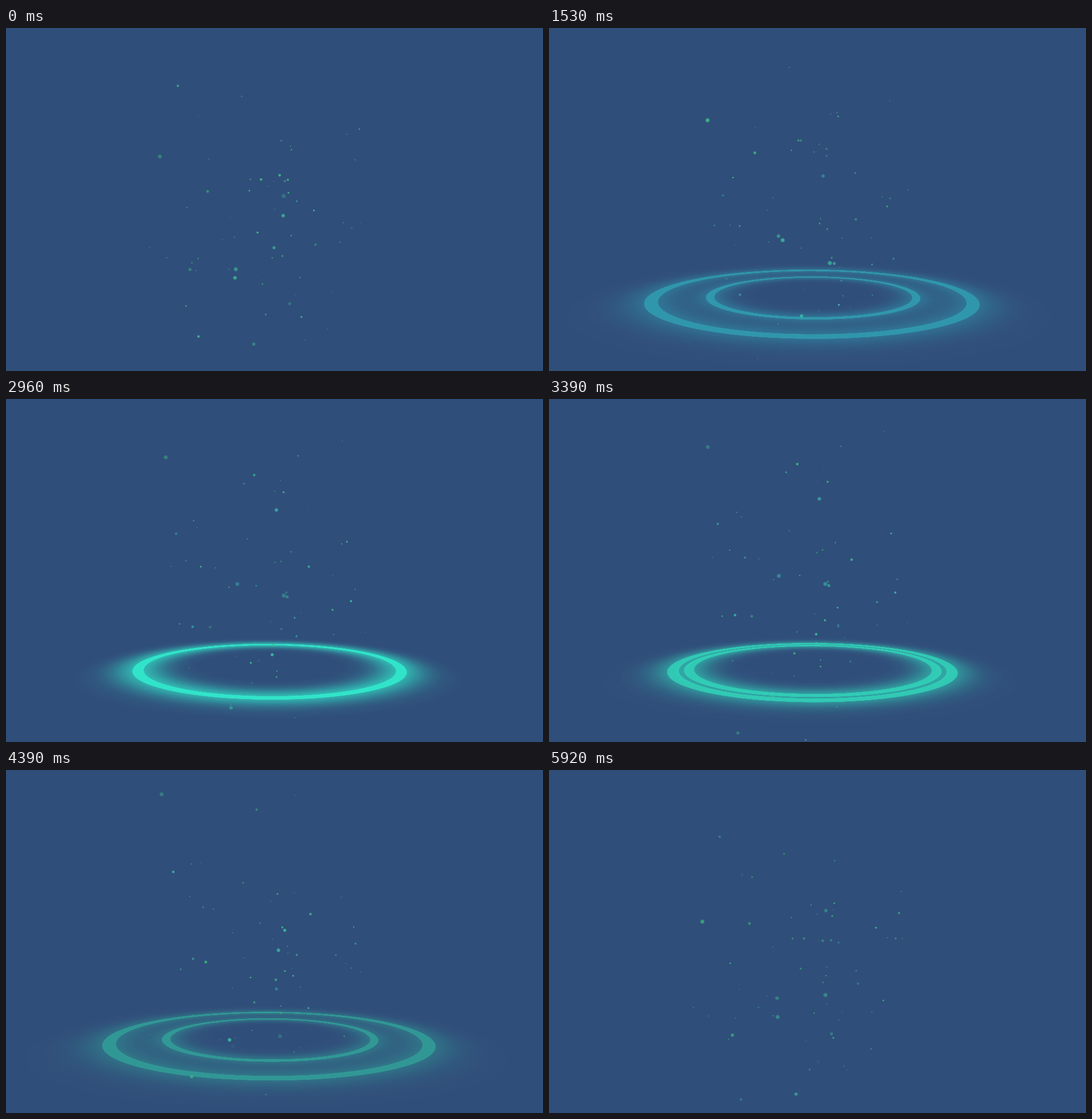
An HTML page with a canvas for the animation above (5970 ms loop, 936 px wide and 599 px high).

```html
<!DOCTYPE html>
<html lang="en">
<head>
<meta charset="utf-8">
<title>Glowing rings</title>
<style>
  html, body { margin: 0; width: 100%; height: 100%; overflow: hidden; background: #304e7a; }
  canvas { position: absolute; left: 0; top: 0; }
  .ring {
    position: absolute; left: 61.6px; top: 64.2px;
    width: 800px; height: 800px; box-sizing: border-box;
    border: 30px solid; border-radius: 50%;
    box-shadow: 0 0 120px, inset 0 0 120px;
  }
</style>
</head>
<body>
<div class="ring" id="outer"></div>
<div class="ring" id="inner"></div>
<canvas id="dots" width="936" height="599"></canvas>
<script>
const LOOP = 5970;
const FLOOR = 'matrix3d(1,.012,0,0, -.04,.1965,0,-.0011, 0,0,1,0, 0,0,0,1)';
const outer = document.getElementById('outer');
const inner = document.getElementById('inner');
const ctx = document.getElementById('dots').getContext('2d');

const clamp = v => Math.max(0, Math.min(1, v));
const mix = (a, b, k) => a + (b - a) * k;

let seed = 41;
const rand = () => (seed = seed * 16807 % 2147483647) / 2147483647;
const spread = size => (rand() + rand() - 1) * size;

function setRing(el, size, color, alpha) {
  el.style.transform = `${FLOOR} scale(${size / 2})`;
  el.style.color = color;
  el.style.opacity = alpha;
}

// The rings meet halfway through the loop, then part again
function drawRings(ms) {
  const p = 1 - Math.abs(2 * ms / LOOP - 1);
  const color = `rgb(48,232,${Math.round(mix(255, 150, ms / LOOP))})`;
  const alpha = .85 * clamp((p - .015) / .985) ** .9;
  setRing(outer, mix(1.643, 1.153, p), color, alpha);
  setRing(inner, mix(.66, 1.157, p), color, alpha);
}

// Each dot rises, sways and fades, then starts again from below
const dots = Array.from({ length: 66 }, () => ({
  x: 468 + spread(235),
  y: 345 + spread(235),
  r: .8 + 3 * rand() ** 2,
  speed: 28 + rand() * 20,
  life: 4 + rand() * 3,
  born: rand(),
  phase: rand() * 2 * Math.PI,
  teal: rand()
}));

function drawDot(d, ms) {
  const s = ms / 1000;
  const k = (s / d.life + d.born) % 1;
  const x = d.x + 6 * Math.sin(s + d.phase);
  const y = d.y - d.speed * d.life * (k - .5);
  const twinkle = .7 + .25 * Math.sin(s * 1.7 + d.phase);
  const alpha = twinkle * clamp(Math.sin(Math.PI * k) * 3);
  const teal = d.teal * (.6 + .4 * Math.sin(Math.PI * ms / LOOP));
  const rgb = `60,190,${Math.round(mix(112, 185, teal))}`;
  const r = d.r * 1.2;
  const glow = ctx.createRadialGradient(x, y, 0, x, y, r);
  glow.addColorStop(0, `rgba(${rgb},${alpha})`);
  glow.addColorStop(.55, `rgba(${rgb},${alpha * .9})`);
  glow.addColorStop(1, `rgba(${rgb},0)`);
  ctx.fillStyle = glow;
  ctx.fillRect(x - r, y - r, r * 2, r * 2);
}

let begin;
function frame(now) {
  begin ??= now;
  const ms = (now - begin) % LOOP;
  drawRings(ms);
  ctx.clearRect(0, 0, 936, 599);
  for (const d of dots) drawDot(d, ms);
  requestAnimationFrame(frame);
}
requestAnimationFrame(frame);
</script>
</body>
</html>
```
